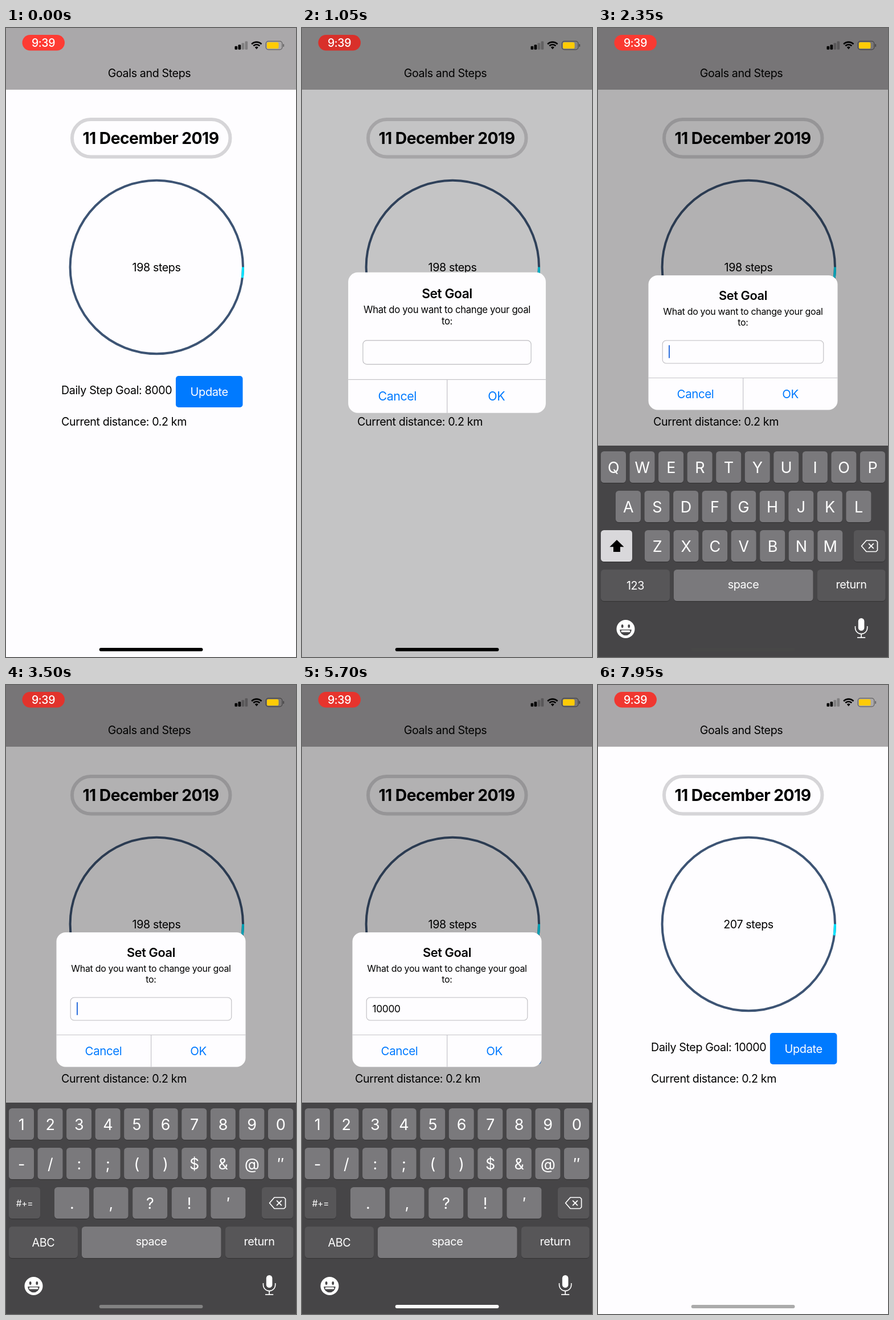
Write an HTML page with a canvas that moves like this. It is 509 px wide and 1101 px high and loops after 8 s.

```html
<!DOCTYPE html>
<html lang="en">
<head>
<meta charset="utf-8">
<title>Goals and Steps</title>
<style>
html, body { margin: 0; width: 100%; height: 100%; overflow: hidden; background: #fefdff; }
canvas { display: block; width: 509px; height: 1101px; }
</style>
</head>
<body>
<canvas id="stage"></canvas>
<script>
const W = 509, H = 1101, LOOP = 8000;
const WHITE = '#fefdff', BLUE = '#007aff';
const dpr = window.devicePixelRatio || 1;

function prepare(canvas) {
  canvas.width = W * dpr;
  canvas.height = H * dpr;
  return canvas.getContext('2d');
}
const stage = document.getElementById('stage');
const layer = document.createElement('canvas');
const screen = prepare(stage), overlay = prepare(layer);
let c = screen;

// Typing: the field content from each time on
const typed = [[3800, '1'], [4250, '10'], [4500, '100'], [4730, '1000'], [4960, '10000']];
const POPUP_MS = 110;

// Linear interpolation through [time, value] points
function track(t, points) {
  if (t <= points[0][0]) return points[0][1];
  for (let i = 1; i < points.length; i++) {
    const [t0, v0] = points[i - 1], [t1, v1] = points[i];
    if (t <= t1) return v0 + (v1 - v0) * (t - t0) / (t1 - t0);
  }
  return points[points.length - 1][1];
}
const phase = (t, from, to) => Math.min(1, Math.max(0, (t - from) / (to - from)));
const easeOut = p => 1 - (1 - p) * (1 - p);
const easeInOut = p => p * p * (3 - 2 * p);
const rgb = (r, g = r, b = r) => `rgb(${r | 0},${g | 0},${b | 0})`;

function setFont(size, weight = 400) {
  c.font = `${weight} ${size}px Inter, sans-serif`;
  c.letterSpacing = `${-0.02 * size}px`;
}
function text(str, x, y, size, { align = 'center', color = '#000', weight = 400 } = {}) {
  setFont(size, weight);
  c.textAlign = align;
  c.fillStyle = color;
  c.fillText(str, x, y);
}
function box(x, y, w, h, r, fill) {
  c.beginPath();
  c.roundRect(x, y, w, h, r);
  c.fillStyle = fill;
  c.fill();
}
function frame(x, y, w, h, r, width, color) {
  c.beginPath();
  c.roundRect(x, y, w, h, r);
  c.lineWidth = width;
  c.strokeStyle = color;
  c.stroke();
}
function poly(points, fill) {
  c.beginPath();
  points.forEach(p => c.lineTo(...p));
  c.closePath();
  if (fill) { c.fillStyle = fill; c.fill(); }
}
function line(color, width, ...points) {
  c.beginPath();
  points.forEach((p, i) => i ? c.lineTo(...p) : c.moveTo(...p));
  c.strokeStyle = color;
  c.lineWidth = width;
  c.stroke();
}
function arc(x, y, r, from, to, width, color) {
  c.beginPath();
  c.arc(x, y, r, from, to);
  c.lineWidth = width;
  c.strokeStyle = color;
  c.stroke();
}

function drawPage(t, entry) {
  c.fillStyle = WHITE;
  c.fillRect(0, 0, W, H);
  c.fillStyle = '#aaa8aa';
  c.fillRect(0, 0, W, 108);
  text('Goals and Steps', 251.5, 86, 19.7);

  frame(116, 160, 277.5, 65.5, 32.7, 6, '#d6d5d8');
  text('11 December 2019', 254, 203, 28.3, { weight: 700 });

  const steps = t < 6400 ? 198 : 207;
  const ratio = Math.min(1, steps / (Number(entry) || 10000));
  arc(264.3, 418.5, 151.7, 0, Math.PI * 2, 4, '#3d5474');
  arc(264.3, 418.5, 151.7, 0, Math.PI * 2 * ratio, 4, '#00e4ff');
  text(`${steps} steps`, 264, 425.5, 19.7);

  // The row stays centred, so a longer goal pushes both ends outward
  const goal = entry || '8000';
  setFont(19.7);
  const shift = (c.measureText('8000').width - c.measureText(goal).width) / 2;
  text(`Daily Step Goal: ${goal}`, 97 + shift, 640.5, 19.7, { align: 'left' });
  text('Current distance: 0.2 km', 97 + shift, 695.5, 19.7, { align: 'left' });
  c.globalAlpha = track(t, [[600, 1], [750, 0.2], [1000, 1]]);
  box(298 - shift, 609, 117.5, 55, 5, BLUE);
  text('Update', 356.7 - shift, 643.5, 20, { color: '#fff' });
  c.globalAlpha = 1;
}

function drawDialog(t, entry) {
  box(88.5, 433, 332, 235.5, 16, WHITE);
  if (t > 7050 && t < 7220) {
    box(254.5, 612.5, 166, 56, [0, 0, 16, 0], '#e4e3e6');
  }
  text('Set Goal', 254.5, 476, 21.8, { weight: 600 });
  text('What do you want to change your goal', 254.5, 501.5, 16);
  text('to:', 254.5, 520.5, 16);
  frame(113.2, 547, 282.6, 40, 6.5, 1.1, '#bdbcc0');
  text(entry, 123.5, 573, 17.4, { align: 'left' });

  const typing = t > 3750 && t < 5480;
  const blink = (t < 3750 ? t - 1250 : t - 4980) % 1000 < 500;
  if (t > 1250 && (typing || blink)) {
    const x = 124 + (entry ? c.measureText(entry).width - 0.5 : 0);
    box(x, 555, 2, 23, 1, '#2e6fdc');
  }
  line('#c5c4c8', 1.2, [88.5, 612.5], [420.5, 612.5]);
  line('#c5c4c8', 1.2, [254.7, 612.5], [254.7, 668.5]);
  text('Cancel', 171, 647.5, 20.5, { color: BLUE });
  text('OK', 337.5, 647.5, 20.5, { color: BLUE });
}

function key(x, y, w, fill, label = '', size = 27) {
  box(x, y + 1.2, w, 55, 5.5, '#363537');
  box(x, y, w, 55, 5.5, fill);
  text(label, x + w / 2, y + 28 + size * 0.36, size, { color: '#fff' });
}
function keyRow(labels, x, y, w, step, fill) {
  [...labels].forEach((label, i) => key(x + i * step, y, w, fill, label));
}

function drawPopup(digit, fill) {
  c.save();
  // The first key mirrors the shape used for the last one
  if (digit === '1') { c.translate(W, 0); c.scale(-1, 1); }
  c.beginPath();
  c.moveTo(440, 665);
  c.lineTo(493, 665);
  c.quadraticCurveTo(504.5, 665, 504.5, 677);
  c.lineTo(504.5, 791);
  c.quadraticCurveTo(504.5, 796, 499, 796);
  c.lineTo(466, 796);
  c.quadraticCurveTo(460.5, 796, 460.5, 791);
  c.lineTo(460.5, 760);
  c.quadraticCurveTo(460.5, 751, 453, 745);
  c.lineTo(434, 729);
  c.quadraticCurveTo(428, 724, 428, 715);
  c.lineTo(428, 677);
  c.quadraticCurveTo(428, 665, 440, 665);
  c.fillStyle = fill;
  c.fill();
  c.restore();
  text(digit, digit === '1' ? 43 : 466, 713, 41, { color: '#fff', weight: 300 });
}

function drawIcons(back) {
  // Delete
  c.lineJoin = 'round';
  poly([[462.5, 906.7], [471, 897], [488, 897], [490.5, 899.5], [490.5, 914], [488, 916.5], [471, 916.5]]);
  c.strokeStyle = '#fff';
  c.lineWidth = 1.7;
  c.stroke();
  line('#fff', 1.8, [475, 902.3], [483.8, 911.2]);
  line('#fff', 1.8, [483.8, 902.3], [475, 911.2]);

  // Face
  box(32.5, 1036, 32, 32, 16, '#fff');
  c.fillStyle = back;
  for (const x of [42.7, 54.3]) {
    c.beginPath();
    c.ellipse(x, 1047, 1.9, 3, 0, 0, Math.PI * 2);
    c.fill();
  }
  c.beginPath();
  c.arc(48.5, 1053, 10.3, 0, Math.PI);
  c.closePath();
  c.fill();
  box(40.5, 1054.2, 16, 3.2, 1.5, '#fff');

  // Microphone
  box(456.8, 1033, 10.6, 22, 5.3, '#fff');
  c.beginPath();
  c.moveTo(451.5, 1047);
  c.lineTo(451.5, 1050);
  c.arc(462.1, 1050, 10.6, Math.PI, 0, true);
  c.lineTo(472.7, 1047);
  c.lineWidth = 1.6;
  c.stroke();
  line('#fff', 1.7, [462.1, 1060], [462.1, 1067]);
  line('#fff', 1.7, [455, 1067], [469.2, 1067]);
}

function drawKeyboard(t, offset, dim) {
  const lift = (1 - dim) * 18;
  const back = rgb(70 + lift, 69 + lift, 71 + lift);
  const light = rgb(122 + lift, 121 + lift, 124 + lift);
  const dark = rgb(87 + lift, 86 + lift, 88 + lift);
  const numeric = t >= 3500;
  c.save();
  c.translate(0, offset);
  c.fillStyle = back;
  c.fillRect(0, 731, W, 400);
  keyRow(numeric ? '1234567890' : 'QWERTYUIOP', 5, 741, 44, 50.55, light);
  if (numeric) {
    keyRow('-/:;()$&@″', 5, 810, 44, 50.55, light);
    keyRow('.,?!′', 85, 879, 61, 68.6, light);
    key(5, 879, 55, dark, '#+=', 15.5);
  } else {
    keyRow('ASDFGHJKL', 31, 810, 44, 50.55, light);
    keyRow('ZXCVBNM', 82, 879, 44, 50.55, light);
    key(5, 879, 55, '#d9d8db');
    poly([[33, 896], [45.5, 908.3], [39, 908.3], [39, 917], [27, 917], [27, 908.3], [20.5, 908.3]], '#000');
  }
  key(449, 879, 55, dark);
  key(5, 948, 121, dark, numeric ? 'ABC' : '123', 19.8);
  key(133, 948, 244.5, light);
  key(385, 948, 119.5, dark);
  text('space', 255, 980.5, 19.8, { color: '#fff' });
  text('return', 444.5, 980.5, 19.8, { color: '#fff' });
  drawIcons(back);

  const press = typed.find(([at]) => t >= at && t < at + POPUP_MS);
  if (press) drawPopup(press[1].slice(-1), light);
  c.restore();
}

function drawStatus(t) {
  const glow = 0.5 + 0.5 * Math.cos(t / 2100 * Math.PI * 2);
  box(28.5, 12, 74.5, 27.5, 13.7, rgb(217 + 38 * glow, 48 + 12 * glow, 42 + 10 * glow));
  text('9:39', 65.5, 33, 19.5, { color: '#fff', weight: 500 });

  [6, 8.5, 11.5, 14.5].forEach((h, i) => {
    box(401.5 + i * 6, 37.7 - h, 4.7, h, 1.2, i < 2 ? '#000' : 'rgba(0,0,0,.25)');
  });

  const a = Math.PI * 0.25, up = -Math.PI / 2;
  arc(439.8, 36.8, 12.2, up - a, up + a, 2.8, '#000');
  arc(439.8, 36.8, 7.8, up - a, up + a, 2.6, '#000');
  c.beginPath();
  c.moveTo(439.8, 37.3);
  c.arc(439.8, 36.8, 4.2, up - a, up + a);
  c.closePath();
  c.fillStyle = '#000';
  c.fill();

  frame(456.2, 23.2, 28.6, 14.6, 4.3, 1.3, 'rgba(0,0,0,.42)');
  box(458, 25, 20.5, 11, 2.6, '#ffcb05');
  box(486.3, 28, 1.8, 5, 0.9, 'rgba(0,0,0,.42)');
}

function drawHome(t) {
  const v = track(t, [[1450, 0], [2350, 71], [4350, 174], [5700, 250], [7350, 250], [7950, 171]]);
  box(163.7, 1085, 181.8, 6, 3, rgb(v));
}

function draw(t) {
  const entry = typed.reduce((now, [at, str]) => t >= at ? str : now, '');
  const enter = easeOut(phase(t, 850, 1250));
  const leave = phase(t, 7210, 7510);
  const dim = enter * (1 - leave);

  c = screen;
  c.setTransform(dpr, 0, 0, dpr, 0, 0);
  drawPage(t, entry);

  if (dim > 0) {
    c.fillStyle = `rgba(0,0,0,${0.3 * dim})`;
    c.fillRect(0, 0, W, H);

    // The dialog fades as one group
    c = overlay;
    c.setTransform(dpr, 0, 0, dpr, 0, 0);
    c.clearRect(0, 0, W, H);
    const scale = 1.18 - 0.18 * enter;
    c.translate(254.5, 550.7);
    c.scale(scale, scale);
    c.translate(-254.5, -550.7);
    drawDialog(t, entry);
    c = screen;
    c.globalAlpha = Math.min(1, enter / 0.7) * (1 - leave);
    c.drawImage(layer, 0, 0, W, H);
    c.globalAlpha = 1;
  }

  const shown = easeOut(phase(t, 1450, 1850)) - easeInOut(phase(t, 7350, 7650));
  if (shown > 0) drawKeyboard(t, 370 * (1 - shown), dim);
  drawStatus(t);
  drawHome(t);
}

function tick() {
  draw(performance.now() % LOOP);
  requestAnimationFrame(tick);
}
tick();
</script>
</body>
</html>
```
